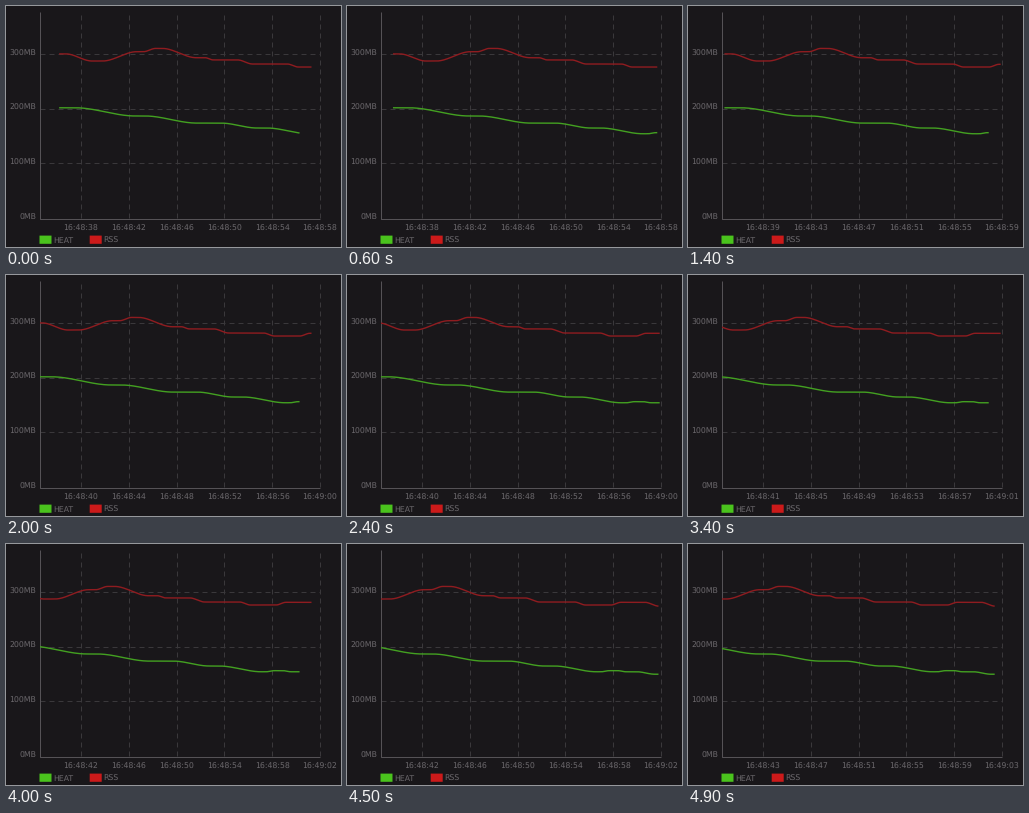
A matplotlib script that plays this animation: 335 px wide and 241 px high, repeating every 5000 ms.

```python
import matplotlib.pyplot as plt
import numpy as np
from matplotlib.animation import FuncAnimation
from matplotlib.patches import Rectangle

plt.rcParams["text.hinting"] = "none"

WIDTH, HEIGHT, DPI = 335, 241, 64
PX = 72 / DPI                      # points per pixel
LEFT, RIGHT, BASE = 33.5, 314, 212
PX_PER_MB = 0.547
SPEED = 11.95                      # pixels per second
FIRST_X = 53.85
FRAMES, INTERVAL = 50, 100
EPS = 1e-6

BG, GRID, AXIS, TEXT = "#19171a", "#3a383b", "#555256", "#6b686c"
GREEN, RED = "#4ac31d", "#cc1a1a"
GREEN_LINE, RED_LINE = "#43a021", "#8f1c20"

# Each change of memory use: (middle in seconds, MB gained)
HEAT_STEPS = [(3.8, -15), (9.3, -13), (15, -9), (19.1, -10.5),
              (21.6, 2), (23, -2), (25, -4.5)]
RSS_STEPS = [(1.6, -13), (5, 17), (7.5, 6), (10, -17), (12.5, -4),
             (15.5, -7.5), (19.5, -5.5), (22.5, 5), (25.5, -7)]


def memory(s, start, steps, rate):
    """Memory use after s seconds; larger changes take longer."""
    total = np.full_like(s, start)
    for middle, gain in steps:
        u = np.clip((s - middle) * rate / abs(gain) + 0.5, 0, 1)
        total += gain * u * u * (3 - 2 * u)
    return total


def newest(t, period):
    """Time of the latest sample; RSS comes every second, HEAT every other."""
    return 22 + period * np.floor((t - 0.2) / period + EPS)


def label(x, y, text, ha):
    return ax.text(x, y, text, ha=ha, va="center_baseline", color=TEXT,
                   fontsize=7.7 * PX, family="DejaVu Sans")


def rule(xs, ys, color, **style):
    ax.plot(xs, ys, color=color, lw=PX, solid_capstyle="butt",
            dash_capstyle="butt", **style)


fig = plt.figure(figsize=(WIDTH / DPI, HEIGHT / DPI), dpi=DPI, facecolor=BG)
ax = fig.add_axes([0, 0, 1, 1])
ax.set(xlim=(0, WIDTH), ylim=(HEIGHT, 0))
ax.axis("off")

tick_x = [75 + 47.8 * i for i in range(6)]
dashes = (0, (5, 4))
for x in tick_x:
    rule([x, x], [BASE, 9], GRID, ls=dashes)
for mb in range(0, 400, 100):
    y = BASE - PX_PER_MB * mb
    if mb:
        rule([LEFT, RIGHT], [y, y], GRID, ls=dashes)
    label(30, y - 1.5, f"{mb}MB", "right")
rule([LEFT, LEFT, RIGHT], [6, BASE + 0.5, BASE + 0.5], AXIS)

for x, color, name in [(33.5, GREEN, "HEAT"), (83.7, RED, "RSS")]:
    ax.add_patch(Rectangle((x, 229.6), 12, 8.2, facecolor=color, lw=0,
                           snap=False))
    label(x + 14, 233.8, name, "left")

times = [label(x, 221.5, "", "center") for x in tick_x]
plot_area = Rectangle((LEFT, 0), RIGHT - LEFT, BASE, transform=ax.transData)
series = []
for color, period, *shape in [(RED_LINE, 1, 300.0, RSS_STEPS, 6),
                              (GREEN_LINE, 2, 201.5, HEAT_STEPS, 3)]:
    line, = ax.plot([], [], color=color, lw=1.4 * PX)
    line.set_clip_path(plot_area)
    series.append((line, period, shape))


def update(frame):
    t = frame * INTERVAL / 1000
    for line, period, shape in series:
        s = np.linspace(0, newest(t, period), 400)
        line.set_data(FIRST_X + SPEED * (s - t),
                      BASE - PX_PER_MB * memory(s, *shape))
    first = 48 * 60 + 38 + int(t + 0.2 + EPS)
    for i, text in enumerate(times):
        minute, second = divmod(first + 4 * i, 60)
        text.set_text(f"16:{minute:02d}:{second:02d}")
    return [line for line, *_ in series] + times


anim = FuncAnimation(fig, update, frames=FRAMES, interval=INTERVAL,
                     repeat=True, repeat_delay=0)
plt.show()
```
